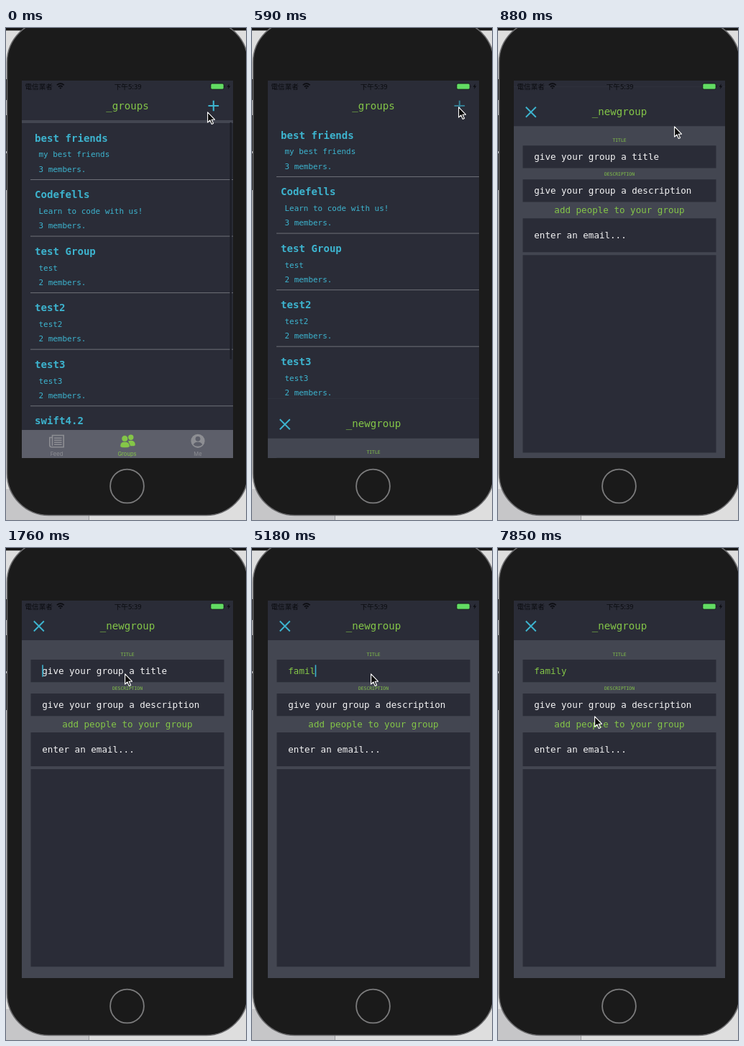
Recreate the animation shown at these times as an HTML page. Size 334 by 683 pixels, loop 8000 ms.

```html
<!DOCTYPE html>
<html lang="en">
<head>
<meta charset="utf-8">
<title>New group</title>
<style>
html, body { margin: 0; width: 100%; height: 100%; overflow: hidden; background: #d6d6d7; }
svg { display: block; width: 334px; height: 683px; }
text { font-family: "DejaVu Sans Mono", monospace; }
.bar { font-family: "Noto Sans CJK TC", "Noto Sans CJK", "Noto Sans CJK SC", "Noto Sans", sans-serif; fill: #0b0c10; }
.tab { font: 7.6px Inter, Roboto, sans-serif; text-anchor: middle; }
.head { font-size: 14.1px; fill: #84c648; text-anchor: middle; }
.name { font-size: 14.1px; font-weight: bold; fill: #3db4cf; }
.info { font-size: 10.95px; fill: #3db4cf; }
.field { font-size: 12.55px; fill: #f4f4f5; }
.mini { font-size: 6.35px; fill: #84c648; text-anchor: middle; }
.mid { text-anchor: middle; }
.green { fill: #84c648; }
.dark { fill: #2a2c37; }
.caret { fill: #3db4cf; }
</style>
</head>
<body>
<svg viewBox="0 0 334 683">
  <defs>
    <clipPath id="screen"><rect x="22" y="73" width="294" height="524"/></clipPath>
    <clipPath id="table"><rect x="22" y="128" width="294" height="430"/></clipPath>
  </defs>

  <!-- backdrop and phone -->
  <rect width="334" height="683" fill="#dedede"/>
  <rect width="334" height="3.5" fill="#161616"/>
  <rect y="640" width="115" height="43" fill="#c6c6c8"/>
  <rect x="115" y="640" width="1" height="43" fill="#9a9a9c"/>
  <path d="M0 71h2v29h-2zM0 121h2v50h-2zM0 174h2v51h-2z" fill="#111"/>
  <rect x="1.5" y="-10.5" width="335" height="687" rx="58" fill="#1b1b1b" stroke="#69696b" stroke-width="1.6"/>
  <circle cx="168.5" cy="636" r="23.4" fill="#1a1a1a" stroke="#7b7b7c" stroke-width="1.8"/>

  <g clip-path="url(#screen)">
    <rect class="dark" x="22" y="73" width="294" height="525"/>
    <g clip-path="url(#table)">
      <rect x="22" y="128" width="294" height="430" fill="#434651"/>
      <g id="list"><rect class="dark" x="22" y="128" width="294" height="480"/></g>
      <rect id="thumb" x="311.5" y="131" width="2.6" height="329" rx="1.3" fill="#1d1e26"/>
    </g>
    <text class="head" x="169" y="112.6">_groups</text>
    <path id="plus" d="M281.5 108h14.6M288.8 100.7v14.6" stroke="#3db4cf" stroke-width="2.1"/>

    <!-- tab bar -->
    <rect x="22" y="558" width="294" height="40" fill="#5d5f6a"/>
    <g fill="none" stroke="#8d8e93" stroke-width="1.6">
      <path d="M64.5 565.5h15.7v16.2H63.500q-2.700 0 -2.700 -2.700V568.500h3.700z"/>
      <path d="M64.500 568v12M67 569.300h10.600M67 572.300h10.600M67 575.300h10.600M67 578.300h10.600"/>
    </g>
    <g class="green">
      <circle cx="173.800" cy="568.200" r="3.700"/>
      <path d="M170 573.200q9.800 -2 9.800 5.300q0 1.700 -3 1.800h-4z"/>
      <g stroke="#5d5f6a" stroke-width=".8">
        <circle cx="165.300" cy="570" r="4.500"/>
        <path d="M158.800 580.500q-.2 -6.300 6.500 -6.300t7 6.300q-.5 2.300 -6.800 2.300t-6.700 -2.300z"/>
      </g>
    </g>
    <circle cx="267" cy="573.300" r="9.600" fill="#8d8e93"/>
    <g fill="#5d5f6a"><circle cx="267" cy="570.300" r="3.400"/><path d="M260.800 578.500q1 -3.800 6.200 -3.800t6.200 3.800q-2.500 2.300 -6.200 2.300t-6.200 -2.300z"/></g>
    <text class="tab" x="70.500" y="594" fill="#8d8e93">Feed</text>
    <text class="tab green" x="168.500" y="594">Groups</text>
    <text class="tab" x="267" y="594" fill="#8d8e93">Me</text>

    <!-- new group sheet -->
    <g id="sheet">
      <rect x="22" y="73" width="294" height="525" fill="#434651"/>
      <rect class="dark" x="22" y="73" width="294" height="55"/>
      <path d="M38.800 101.500l14 14M52.800 101.500l-14 14" stroke="#3db4cf" stroke-width="1.9"/>
      <text class="head" x="169" y="112.600">_newgroup</text>
      <path class="dark" d="M34.500 155h269v31.300h-269zM34.500 202h269v31.300h-269zM34.500 256h269v47h-269zM34.500 307h269v274.300h-269z"/>
      <text class="mini" x="169" y="149.600">TITLE</text>
      <text class="mini" x="169" y="196.500">DESCRIPTION</text>
      <text class="field" id="title" x="50.300" y="175"></text>
      <text class="field" x="50.300" y="222">give your group a description</text>
      <text class="field green mid" x="169" y="249">add people to your group</text>
      <text class="field" x="50.300" y="284">enter an email...</text>
      <rect id="caret" class="caret" width="1.600" height="16.500"/>
    </g>

    <!-- status bar -->
    <text class="bar" x="26.500" y="84.600" font-size="9.600">電信業者</text>
    <g fill="none" stroke="#0b0c10" stroke-width="1.500">
      <path d="M70.800 79.300q5 -4.400 10 0M72.900 81.600q2.900 -2.500 5.800 0"/>
    </g>
    <path d="M74.300 83.100q1.500 -1.200 3 0l-1.500 1.700z" fill="#0b0c10"/>
    <text class="bar mid" x="169.700" y="84.600" font-size="9.600" font-weight="500">下午5:39</text>
    <rect x="284.800" y="77" width="18.400" height="8.200" rx="2" fill="#62dc63" stroke="#14161b" stroke-width="1"/>
    <path d="M304.300 79.800q1.500 1.300 0 2.600z" fill="#14161b"/>
    <path d="M310.800 77.300l-3.200 4.400h2.200l-.8 3.400 3.300 -4.600h-2.200z" fill="#0b0c10"/>
  </g>

  <path id="pointer" d="M.6 .8V15.100L3.900 12l2.400 5.500 2.300 -1 -2.400 -5.300H10.500Z" fill="#0a0a0a" stroke="#fff" stroke-width="1.100" stroke-linejoin="round"/>
</svg>
<script>
const LOOP = 8000, TICKS = 54, LEAD = 18;
const $ = id => document.getElementById(id);
const set = (el, attrs) => { for (const k in attrs) el.setAttribute(k, attrs[k]); };

function add(tag, attrs, text) {
  const el = document.createElementNS("http://www.w3.org/2000/svg", tag);
  set(el, attrs);
  if (text) el.textContent = text;
  $("list").appendChild(el);
}

const groups = [
  ["best friends", "my best friends", 3],
  ["Codefells", "Learn to code with us!", 3],
  ["test Group", "test", 2],
  ["test2", "test2", 2],
  ["test3", "test3", 2],
  ["swift4.2", "", 2]
];
groups.forEach(([name, info, count], i) => {
  const y = 128 + i * 78.55;
  add("text", { class: "name", x: 40, y: y + 25.6 }, name);
  add("text", { class: "info", x: 45.5, y: y + 47.4 }, info);
  add("text", { class: "info", x: 45.5, y: y + 67.6 }, count + " members.");
  add("rect", { x: 34, y: y + 78, width: 282, height: 1, fill: "#6d6f77" });
});

const pointerKeys = [
  [0, 280, 116], [3, 287, 109], [4, 287, 109], [5, 283, 113], [6, 245, 136],
  [7, 192, 168], [8, 168, 177], [10, 165, 174], [44, 165, 174], [45, 158, 184],
  [47, 135, 217], [48, 133, 222], [52, 133, 222], [53, 134, 233]
];
const typeTicks = [23, 30, 32, 33, 35, 39];
const blinkStarts = [12, 22, 30, 32, 33, 35, 39, 47];
const blink = [1, 1, 1, 1, .5, 0, 0, .5];

function along(keys, n) {
  const i = keys.findIndex(k => k[0] > n);
  if (i < 0) return keys[keys.length - 1].slice(1);
  const a = keys[i - 1], b = keys[i], p = (n - a[0]) / (b[0] - a[0]);
  return a.slice(1).map((v, j) => v + (b[j + 1] - v) * p);
}

// Critically damped spring: share of the way still to go.
function remaining(n) {
  const s = Math.max(0, n - 3.74) * LOOP / TICKS / 1000 * 18.26;
  return n >= 8 ? 0 : (1 + s) * Math.exp(-s);
}

function caretOpacity(n) {
  if (n < 12 || (n > 44 && n < 47)) return 0;
  const start = blinkStarts.filter(b => b <= n).pop();
  return blink[(n - start) % blink.length];
}

function draw(n) {
  const bounce = [4, 1.5, .4][n] || 0;
  set($("list"), { transform: `translate(0 ${bounce})` });
  set($("thumb"), { opacity: [1, .7, .3][n] || 0 });
  set($("plus"), { opacity: n === 3 ? .4 : n === 4 ? .6 : 1 });
  set($("sheet"), { transform: `translate(0 ${524 * remaining(n)})` });

  const typed = typeTicks.filter(t => t <= n).length;
  $("title").textContent = typed ? "family".slice(0, typed) : "give your group a title";
  $("title").classList.toggle("green", typed > 0);

  const inTitle = n < 46;
  set($("caret"), {
    x: 50.2 + (inTitle ? typed * 7.5 : 0),
    y: inTitle ? 162.3 : 209.3,
    opacity: caretOpacity(n)
  });
  set($("pointer"), { transform: `translate(${along(pointerKeys, n)})` });
}

function frame(now) {
  const t = now % LOOP;
  draw(Math.min(TICKS - 1, Math.floor((t + LEAD) * TICKS / LOOP)));
  requestAnimationFrame(frame);
}
draw(0);
const begin = performance.now();
requestAnimationFrame(function loop(now) { frame.start = begin; frame(Math.max(0, now)); });
</script>
</body>
</html>
```
